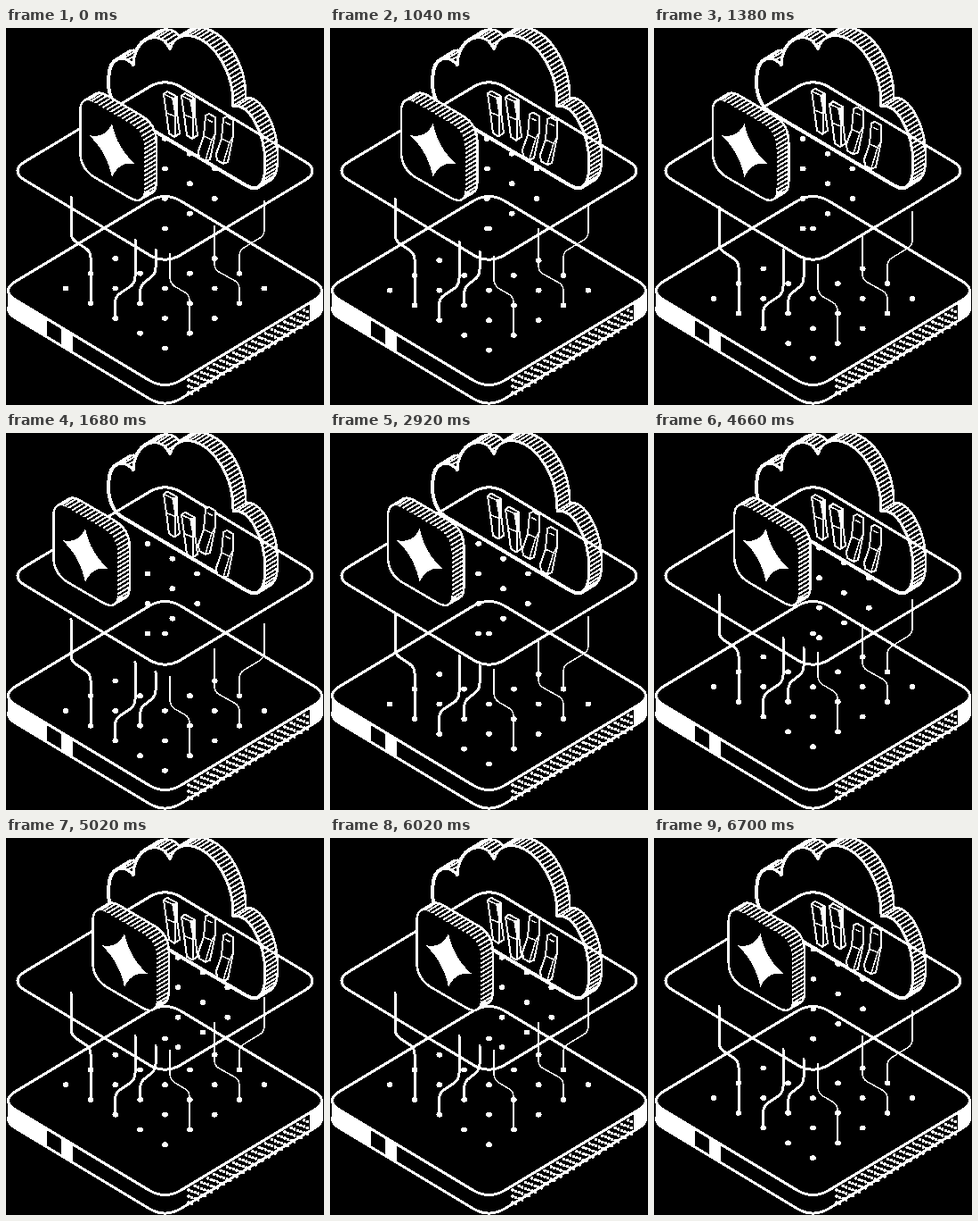
Recreate the animation shown at these times as an HTML page. Size 357 by 422 pixels, loop 6.72 s.

```html
<!DOCTYPE html>
<html lang="en">
<head>
<meta charset="utf-8">
<title>Isometric cloud platform</title>
<style>
html, body { margin: 0; width: 100%; height: 100%; overflow: hidden; background: #000; }
svg { display: block; width: 357px; height: 422px; }
path, ellipse { shape-rendering: crispEdges; }
.line { fill: none; stroke: #fff; stroke-width: 3; stroke-linejoin: round; stroke-linecap: round; }
.white { fill: #fff; }
.line.black { fill: #000; }
.thin { stroke-width: 1.5; }
.mid { stroke-width: 2; }
.rim { stroke-width: 5; }
</style>
</head>
<body>
<svg id="stage" viewBox="0 0 357 422">
  <g id="base"></g>
  <g id="floor"></g>
  <g id="upper"></g>
  <g id="cloud"></g>
  <g id="plate"></g>
  <g id="keys"></g>
  <g id="box"></g>
</svg>
<script>
const $ = id => document.getElementById(id);

function add(parent, tag, attrs) {
  const el = document.createElementNS('http://www.w3.org/2000/svg', tag);
  for (const k in attrs) el.setAttribute(k, attrs[k]);
  parent.appendChild(el);
  return el;
}
const path = (parent, d, cls, extra) => add(parent, 'path', { d, class: cls, ...extra });
const dot = (parent, cx, cy, rx = 3.4, ry = 2.9) => add(parent, 'ellipse', { cx, cy, rx, ry, class: 'white' });

// Closed polygon with softened corners; r is the cut along each edge.
function rounded(points, r) {
  const n = points.length;
  const toward = (a, b) => {
    const k = r / Math.hypot(b[0] - a[0], b[1] - a[1]);
    return [a[0] + (b[0] - a[0]) * k, a[1] + (b[1] - a[1]) * k];
  };
  return points.map((p, i) => {
    const from = toward(p, points[(i + n - 1) % n]);
    const to = toward(p, points[(i + 1) % n]);
    return `${i ? 'L' : 'M'}${from}Q${p} ${to}`;
  }).join('') + 'Z';
}
const rhombus = (cy, w, h) => rounded([[178.5, cy - h], [178.5 + w, cy], [178.5, cy + h], [178.5 - w, cy]], 21);

// Sweep a face along (dx, dy): outer contour, hatched rim, then the face on top.
function extrude(parent, d, dx, dy, faceClass) {
  for (const cls of ['line rim', '']) {
    for (let k = 0; k <= 1; k += 0.125) path(parent, d, cls, { transform: `translate(${dx * k} ${dy * k})` });
  }
  const face = path(parent, d, faceClass);
  const len = face.getTotalLength();
  let hatch = '';
  for (let s = 0; s < len; s += 5) {
    const p = face.getPointAtLength(s);
    hatch += `M${p.x} ${p.y}l${dx} ${dy}`;
  }
  parent.insertBefore(path(parent, hatch, 'line mid'), face);
}

// Base slab
const base = $('base');
const slab = rhombus(294, 185, 111);
path(base, slab, 'line', { transform: 'translate(0 20.5)' });
path(base, 'M3 293V314M354.5 293V314', 'line');
path(base, 'M3 300L46 325V346L8 324L3 317ZM62 335L75 343V364L62 356ZM341 308L355 299V317L341 328Z', 'white');
for (let i = 0; i < 38; i++) for (let j = 0; j < 3; j++) {
  const x = 205 + i * 3.6;
  dot(base, x, 394 - (x - 205) * 0.602 + j * 7 + i % 2 * 3.5, 1.8, 1.8);
}
path(base, slab, 'line black');

// Floor dots and wires
const floor = $('floor');
const STEP = [27.85, 16.75];
for (let i = 0; i < 5; i++) for (let j = 0; j < 5; j++) {
  if (i > 1 || j > 1) dot(floor, 178.5 + (i - j) * STEP[0], 224.5 + (i + j) * STEP[1]);
}
[
  ['M73 189V229Q73 235 78 239L90 247Q95 251 95 257V307', ''],
  ['M145 237V278Q145 285 140 289L128 297Q122.5 301 122.5 308V324', ''],
  ['M168 248V268Q168 274 164 278L154 286Q150.5 290 150.5 297V307', ''],
  ['M184 253V279Q184 285 189 289L201 296Q206 299 206 305V341', 'thin'],
  ['M234 222V264Q234 270 239 273L257 283Q262 286 262 292V307', 'thin'],
  ['M290 194V226Q290 232 285 235L267 246Q262 249 262 255V274', 'thin']
].forEach(([d, w]) => path(floor, d, 'line ' + w));

// Upper dots
const upper = $('upper');
for (let i = 0; i < 5; i++) for (let j = 0; j < 5; j++) {
  if (i >= j && i - j < 3) dot(upper, 178.5 + (i - j) * STEP[0], 90.5 + (i + j) * STEP[1]);
}
dot($('plate'), 178.5, 224.5);

// Cloud and plate
extrude($('cloud'), 'M128 92C118 84 114 68 116 53C117 35 131 27 143 42C143 28 150 16 160 12C172 8 180 14 184 24C188 10 200 6 212 10C234 17 256 49 255 88C272 82 291 118 291 152C291 174 284 184 270 176Z', 13, -8, 'line black');
path($('plate'), rhombus(160, 174.6, 104.6), 'line');

// Rocker keys: outline, creases, shaded facet
const left = ['M177 3L181 0L192 6L192 24L195 47L189 51L183 47L180 24Z', 'M177 3L188 8L192 6M188 8L190 28M180 24L190 28L192 24M190 28V50', 'M186 7L192 6V24L190 28Z'];
const right = ['M224 2L228 0L235 4V22L229 51L224 53L217 49L216 42L222 25Z', 'M222 25L231 29L235 22M231 29L224 52M227 7L231 9', ''];
const keys = [
  { art: left, x: 0, y: 71, b: -5.5, c: -4.4 },
  { art: left, x: 20, y: 73, b: 15.7, c: 13 },
  { art: right, x: 0, y: 96, b: -13, c: -10.5 },
  { art: right, x: 20, y: 99, b: 10, c: 8.2 }
];
for (const k of keys) {
  k.el = add($('keys'), 'g', {});
  path(k.el, k.art[0], 'line mid black');
  path(k.el, k.art[1], 'line thin');
  path(k.el, k.art[2], 'white');
}

// App tile
const box = $('box');
extrude(box, rounded([[84.5, 75], [155, 116], [155, 198], [84.5, 157]], 19), 12.5, -7.5, '');
path(box, 'M93 120Q111 124 119 107Q125 135 145 152Q127 149 119 167Q113 138 93 120Z', 'white');

// Start of each move, and the amounts of the two poses before and after it.
const moves = [[960, [0, 0], [1, 0]], [2640, [1, 0], [0, 0]], [4320, [0, 0], [0, 1]], [6000, [0, 1], [0, 0]]];
const LOOP = 6720, MOVE = 720, TICK = 20;

function pose(t) {
  let now = [0, 0];
  for (const [start, from, to] of moves) {
    if (t < start) break;
    const p = Math.min(1, (t - start) / MOVE);
    now = from.map((v, i) => v + (to[i] - v) * p);
  }
  return now;
}

const move = (el, x, y) => el.setAttribute('transform', `translate(${x} ${y})`);

function draw() {
  const t = Math.floor(performance.now() % LOOP / TICK) * TICK;
  const [b, c] = pose(t);
  move(floor, 0, 19.5 * b - 15.7 * c);
  move(upper, 15 * c - 19.5 * b, 10 * c);
  move(box, 14.5 * c - 30 * b, 0);
  for (const k of keys) move(k.el, k.x, k.y + k.b * b + k.c * c);
  requestAnimationFrame(draw);
}
draw();
</script>
</body>
</html>
```
